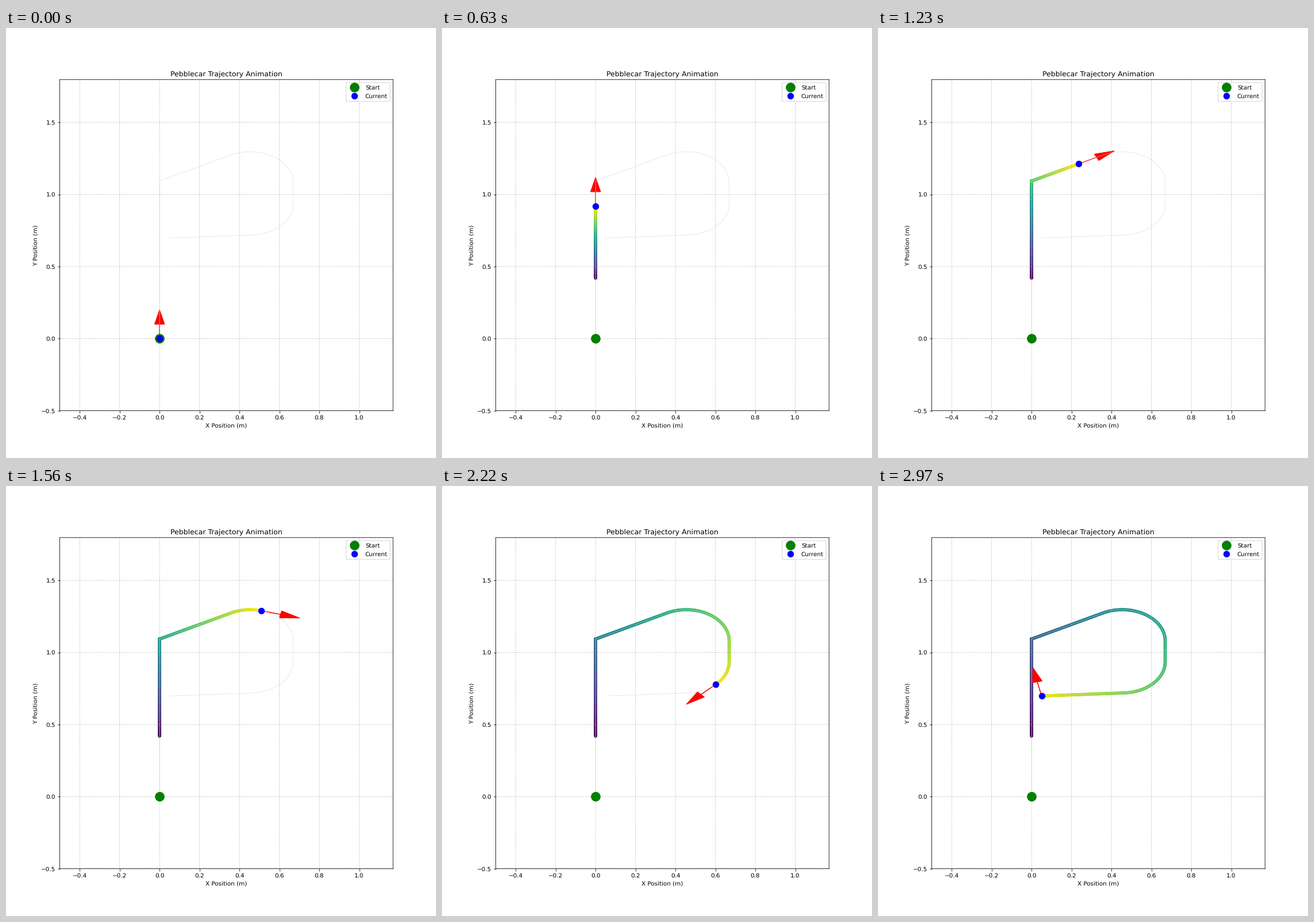
These frames come from a looping animation (748 by 748 pixels, 3 s). A matplotlib script:

```python
import numpy as np
import matplotlib.pyplot as plt
from matplotlib.animation import FuncAnimation

FRAMES, INTERVAL = 100, 30
STEPS = 5  # trail dots per frame

# Route: straight up, turn on the spot, slope, arc, straight down, arc, line home
CORNER = np.array([0.0, 1.093])
R = 0.215
TOP, LOW = np.array([0.454, 1.0815]), np.array([0.454, 0.934])
SLOPE, HOME = np.radians(26.8), np.radians(-177.1)
TURN = np.radians(20.15)  # per frame
END = np.array([0.05, 0.698])


def on_arc(center, heading):
    """Point of a clockwise arc where the bot has this heading."""
    a = heading + np.pi / 2
    return center + R * np.array([np.cos(a), np.sin(a)])


A, B = on_arc(TOP, SLOPE), on_arc(TOP, -np.pi / 2)
C, D = on_arc(LOW, -np.pi / 2), on_arc(LOW, HOME)
LENGTHS = [CORNER[1], np.hypot(*(A - CORNER)), R * (SLOPE + np.pi / 2),
           B[1] - C[1], R * (-np.pi / 2 - HOME), np.hypot(*(END - D))]
MARKS = np.concatenate([[0], np.cumsum(LENGTHS)])


def locate(dist):
    """Position and heading after travelling dist along the route."""
    i = int(np.clip(np.searchsorted(MARKS, dist) - 1, 0, 5))
    s = dist - MARKS[i]
    if i == 2:
        h = SLOPE - s / R
        return on_arc(TOP, h), h
    if i == 4:
        h = -np.pi / 2 - s / R
        return on_arc(LOW, h), h
    start, stop, h = {0: (np.zeros(2), CORNER, np.pi / 2),
                      1: (CORNER, A, SLOPE),
                      3: (B, C, -np.pi / 2),
                      5: (D, END, HOME)}[i]
    return start + (stop - start) * s / LENGTHS[i], h


def pose(t):
    """Position and heading at time t, counted in frames."""
    travelled = CORNER[1] + np.array([0, 0, 0.556, 0.945, 1.406])
    dist = np.interp(t, [0, 1, 28, 31, 52, 66, 83, 95],
                     [0, 0.42, *travelled, MARKS[-1]])
    pos, heading = locate(dist)
    if 28 <= t <= 31:
        heading = max(SLOPE, np.pi / 2 - TURN * (t - 28))
    elif t > 95:
        heading = HOME - TURN * (t - 95)
    return pos, heading


def arrow_vector(heading):
    return 0.1 * np.cos(heading), 0.1 * np.sin(heading)


# The bot leaves its trail from the second frame on
dots = np.array([pose(1 + k / STEPS)[0]
                 for k in range((FRAMES - 2) * STEPS + 1)])

plt.rcParams.update({"text.hinting": "none", "path.snap": False})
fig, ax = plt.subplots(figsize=(10, 10), dpi=74.8)
ax.set_xlim(-0.5, 1.169)
ax.set_ylim(-0.5, 1.7965)
ax.set_xlabel("X Position (m)")
ax.set_ylabel("Y Position (m)")
ax.set_title("Pebblecar Trajectory Animation")
ax.grid(True, linestyle="--", alpha=0.7)

ax.plot([0, *dots[:, 0]], [0, *dots[:, 1]], color="lightgray", linewidth=0.5)
ax.plot(0, 0, "go", markersize=15, label="Start")
current, = ax.plot(0, 0, "bo", markersize=10, label="Current")
trail = ax.scatter([], [], s=20)
arrow = ax.arrow(0, 0, *arrow_vector(np.pi / 2), head_width=0.05,
                 head_length=0.1, fc="red", ec="red")
ax.legend(loc="upper right")


def update(frame):
    (x, y), heading = pose(frame)
    dx, dy = arrow_vector(heading)
    count = max(0, (frame - 1) * STEPS + 1)
    current.set_data([x], [y])
    trail.set_offsets(dots[:count])
    trail.set_color(plt.cm.viridis(np.linspace(0, 1, count)))
    arrow.set_data(x=x, y=y, dx=dx, dy=dy)
    return current, trail, arrow


anim = FuncAnimation(fig, update, frames=FRAMES, interval=INTERVAL,
                     repeat=True, repeat_delay=0)
plt.show()
```
